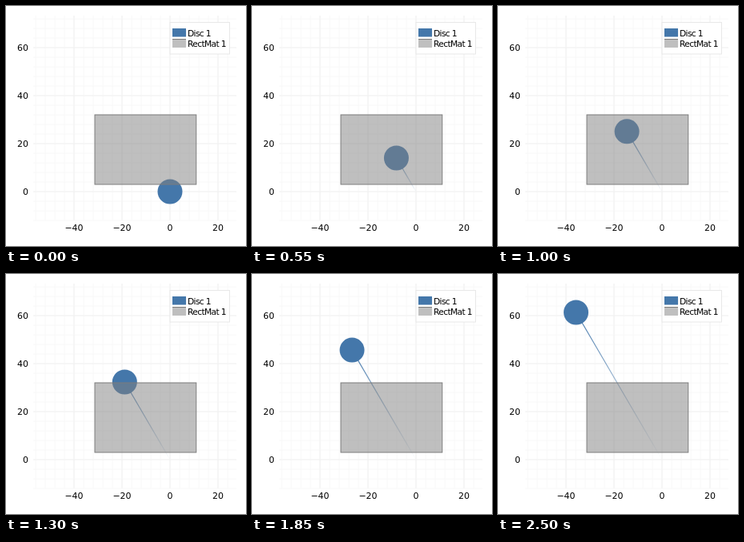
An HTML page that plays this animation: 300 by 300 pixels, repeating every 2.55 s.

```html
<!DOCTYPE html>
<html lang="en">
<head>
<meta charset="utf-8">
<title>Disc crossing a mat</title>
<style>
  html, body { margin: 0; width: 100%; height: 100%; overflow: hidden; background: #fff; }
  svg { display: block; width: 100vw; height: 100vh; }
  text { font-family: "DejaVu Sans", sans-serif; font-size: 11px; fill: #000; }
  .key { font-size: 10.67px; letter-spacing: -0.62px; }
  .minor { stroke: #f8f8f8; }
  .major { stroke: #f1f1f1; }
  .blue { fill: #4477aa; }
  .mat { fill: #808080; fill-opacity: .5; stroke: #7c7c7c; }
</style>
</head>
<body>
<svg viewBox="0 0 300 300">
  <defs>
    <linearGradient id="fade" gradientUnits="userSpaceOnUse" x1="205" y1="232">
      <stop offset="0" stop-color="#4477aa" stop-opacity="0"/>
      <stop offset="1" stop-color="#4477aa"/>
    </linearGradient>
  </defs>
  <g id="grid"></g>
  <line id="trail" x1="205" y1="232" stroke="url(#fade)" stroke-width="1.2"/>
  <circle id="disc" class="blue" r="15.5"/>
  <rect class="mat" x="111" y="136" width="126.8" height="87"/>
  <g id="labels"></g>
  <rect x="205" y="20.5" width="74.5" height="39.5" fill="#fff" stroke="#e8e8e8"/>
  <rect class="blue" x="208" y="28" width="17" height="10.5"/>
  <rect x="208" y="41" width="17" height="11" fill="#bfbfbf"/>
  <path d="M208 41.5h17" stroke="#7c7c7c"/>
  <text class="key" x="227" y="38">Disc 1</text>
  <text class="key" x="227" y="51">RectMat 1</text>
</svg>
<script>
const X0 = 205, Y0 = 232, UNIT = 3, STEP = 50, LOOP = 2550;
const $ = id => document.getElementById(id);

function add(parent, tag, attrs, text = "") {
  const el = document.createElementNS("http://www.w3.org/2000/svg", tag);
  for (const key in attrs) el.setAttribute(key, attrs[key]);
  el.textContent = text;
  $(parent).append(el);
}

function gridLines(cls, gap) {
  for (let v = -56; v <= 72; v += 4) {
    if (v % gap) continue;
    const x = X0 + v * UNIT, y = Y0 - v * UNIT;
    if (v <= 24) add("grid", "path", { class: cls, d: `M${x} 12V268` });
    if (v >= -12) add("grid", "path", { class: cls, d: `M34 ${y}H288` });
  }
}

gridLines("minor", 4);
gridLines("major", 20);

for (let v = -40; v <= 60; v += 20) {
  const label = String(v).replace("-", "\u2212");
  if (v <= 20) add("labels", "text", { x: X0 + v * UNIT, y: 281, "text-anchor": "middle" }, label);
  if (v >= 0) add("labels", "text", { x: 28, y: Y0 - v * UNIT + 4, "text-anchor": "end" }, label);
}

// Early slip dies out, then the disc travels at constant speed.
function position(n) {
  const rise = 3.62 * n + 3 * (1 - Math.exp(-n / 8));
  return [X0 - 0.584 * rise, Y0 - rise];
}

function draw(now) {
  const [x, y] = position(Math.floor((now % LOOP) / STEP));
  $("disc").setAttribute("cx", x);
  $("disc").setAttribute("cy", y);
  for (const id of ["trail", "fade"]) {
    $(id).setAttribute("x2", x);
    $(id).setAttribute("y2", y);
  }
}

let start;
function tick(now) {
  start ??= now;
  draw(now - start);
  requestAnimationFrame(tick);
}
draw(0);
requestAnimationFrame(tick);
</script>
</body>
</html>
```
